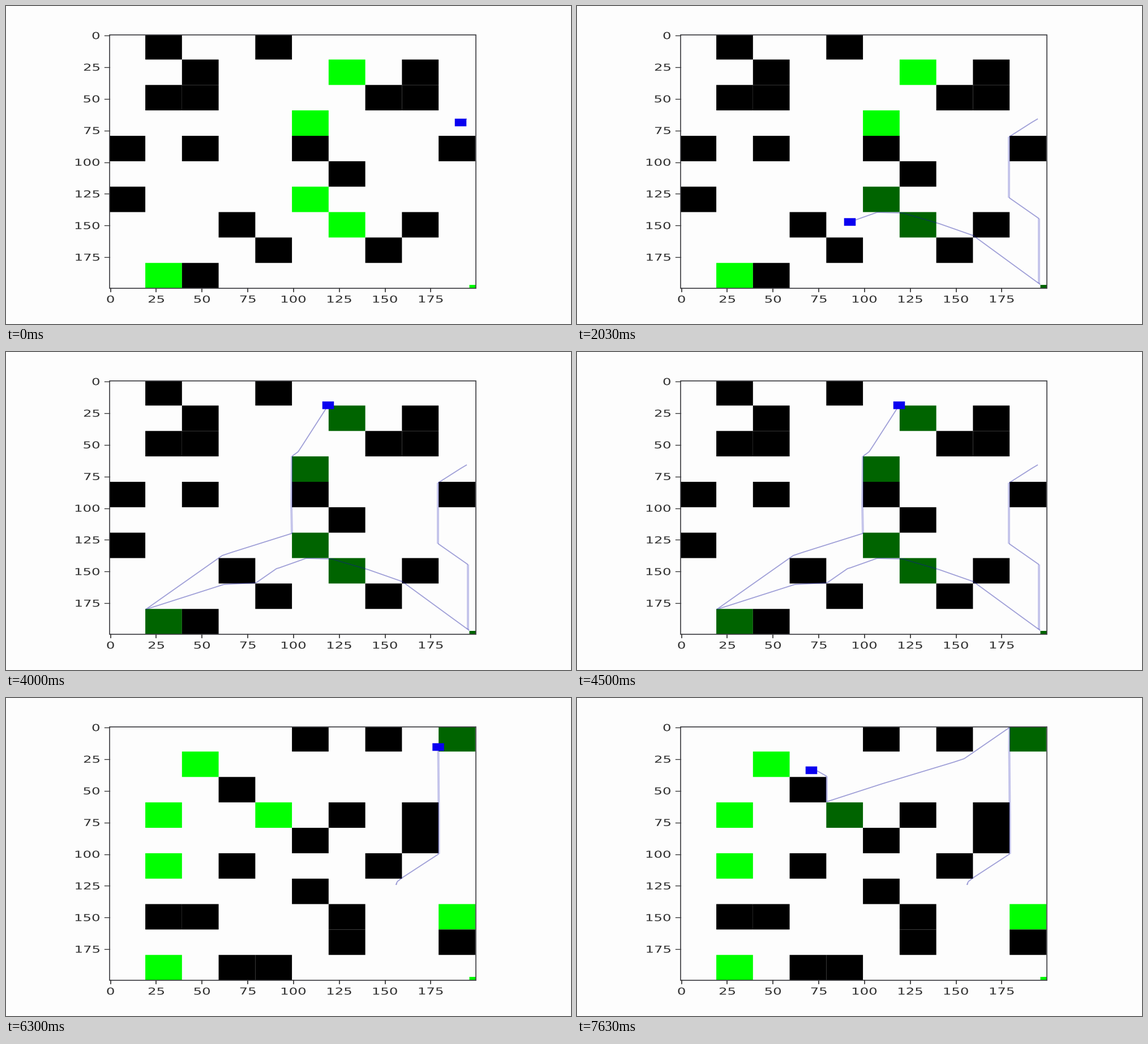
Recreate the animation shown at these times as a matplotlib script. Size 998 px wide and 561 px high, loop 8 s.

```python
import matplotlib.pyplot as plt
from matplotlib.animation import FuncAnimation
from matplotlib.patches import PathPatch, Rectangle
from matplotlib.textpath import TextPath
from matplotlib.transforms import Affine2D

W, H, DPI = 998, 561, 100
LOOP, STEP = 8000, 50
PX = 72 / DPI  # points per pixel

LEFT, TOP, RIGHT, BOTTOM = 183, 51, 829.7, 498
CELL_X, CELL_Y, CELL_W, CELL_H = 181.3, 49.6, 64.76, 44.85
SX, SY = 1.753, 1.21  # the whole 640 x 480 plot is enlarged by these factors
TICK, PAD, FONT = 4.86, 4.86, 13.9

BACK, INK = "#fdfdfd", "#303030"
WALL, TODO, DONE, AGENT = "#000000", "#00ff00", "#006400", "#0a00f0"

# '#' is a wall, 'o' a target
MAZES = [
    """.#..#.....
       ..#...o.#.
       .##....##.
       .....o....
       #.#..#...#
       ......#...
       #....o....
       ...#..o.#.
       ....#..#..
       .o#.......""",
    """.....#.#.o
       ..o.......
       ...#......
       .o..o.#.#.
       .....#..#.
       .o.#...#..
       .....#....
       .##...#..o
       ......#..#
       .o.##.....""",
]
CORNER = "corner"

# Each leg: start time, way points, targets reached
TOURS = [
    [(0, [(814, 199), (803, 205.5)], []),
     (400, [(763, 231), (763, 310)], []),
     (800, [(763, 338), (816, 375), (816, 424)], []),
     (1200, [(816, 489), (818, 491), (787, 468.5)], [CORNER]),
     (1600, [(700, 405), (640, 384)], []),
     (1970, [(575, 365), (530, 364), (482, 381)], [(6, 7), (5, 6)]),
     (2370, [(478, 382), (442, 407), (385, 410), (247, 454)], [(1, 9)]),
     (2800, [(382, 359), (400, 353)], []),
     (3200, [(505, 320), (504, 267)], []),
     (3600, [(505, 184), (516, 176), (522, 167)], [(5, 3)]),
     (4000, [(569, 94)], [(6, 1)])],
    [(5130, [(690, 327), (689, 329.5)], []),
     (5500, [(691, 324), (700, 317), (764.5, 275), (764.5, 205)], []),
     (6300, [(763.5, 86.5)], [(9, 0)]),
     (6800, [(764, 52), (684, 107), (666, 113)], []),
     (7200, [(540, 151)], []),
     (7600, [(441, 183), (441, 138), (425, 129), (414, 127.5)], [(4, 3)])],
]

fig = plt.figure(figsize=(W / DPI, H / DPI), dpi=DPI, facecolor=BACK)
ax = fig.add_axes([0, 0, 1, 1])
ax.set_xlim(0, W)
ax.set_ylim(H, 0)
ax.axis("off")

frame = Rectangle((LEFT, TOP), RIGHT - LEFT, BOTTOM - TOP, fill=False,
                  ec="#404044", lw=1.7 * PX, zorder=6)
ax.add_patch(frame)


def box(x, y, w, h, color, z):
    patch = Rectangle((x, y), w, h, fc=color, lw=0, zorder=z, snap=False)
    ax.add_patch(patch)
    patch.set_clip_path(frame)
    return patch


def label(text, x, y, align):
    """Draw a tick label, centred below (x, y) or ending at x."""
    path = TextPath((0, 0), text, size=FONT, prop={"family": "DejaVu Sans"})
    ext = path.get_extents()
    ox = (ext.x0 + ext.x1) / 2 if align == "center" else ext.x1
    oy = ext.y1 if align == "center" else (ext.y0 + ext.y1) / 2
    move = Affine2D().translate(-ox, -oy).scale(SX, -SY).translate(x, y)
    ax.add_patch(PathPatch(path, fc=INK, lw=0, transform=move + ax.transData))


def draw_ticks():
    for v in range(0, 200, 25):
        x = LEFT + (v + 0.5) * (RIGHT - LEFT) / 200
        y = TOP + (v + 0.5) * (BOTTOM - TOP) / 200
        ax.plot([x, x], [BOTTOM, BOTTOM + TICK * SY], color=INK, lw=1.7 * PX)
        ax.plot([LEFT - TICK * SX, LEFT], [y, y], color=INK, lw=1.3 * PX)
        label(str(v), x, BOTTOM + (TICK + PAD) * SY + 1, "center")
        label(str(v), LEFT - (TICK + PAD) * SX - 1, y, "right")


def build_maze(text):
    """Return the wall patches and a dict of target patches."""
    walls, targets = [], {}
    for row, line in enumerate(text.split()):
        for col, char in enumerate(line):
            if char == ".":
                continue
            spot = (CELL_X + col * CELL_W, CELL_Y + row * CELL_H)
            if char == "#":
                walls.append(box(*spot, CELL_W, CELL_H, WALL, 2))
            else:
                targets[col, row] = box(*spot, CELL_W, CELL_H, TODO, 2)
    targets[CORNER] = box(818.5, 492, 12, 6, TODO, 2)
    return walls, targets


def split_trail(points):
    """Separate upright pieces, which look wider and paler, from the rest."""
    upright, slanted = [], []
    gap = (float("nan"), float("nan"))
    for a, b in zip(points, points[1:]):
        steep = abs(a[0] - b[0]) < 2 and abs(a[1] - b[1]) > 8
        (upright if steep else slanted).extend([a, b, gap])
    return upright or [gap], slanted or [gap]


draw_ticks()
mazes = [build_maze(text) for text in MAZES]
wide, = ax.plot([], [], color="#1414b4", alpha=0.24, lw=4 * PX, zorder=3,
                solid_capstyle="butt")
thin, = ax.plot([], [], color="#1414a0", alpha=0.40, lw=1.8 * PX, zorder=3,
                solid_capstyle="butt")
agent = box(0, 0, 20.5, 13.5, AGENT, 5)


def update(i):
    t = i * STEP
    current = int(t >= TOURS[1][0][0])
    legs = [leg for leg in TOURS[current] if leg[0] <= t]
    trail = [p for leg in legs for p in leg[1]]
    reached = {c for leg in legs for c in leg[2]}

    for k, (walls, targets) in enumerate(mazes):
        for patch in walls + list(targets.values()):
            patch.set_visible(k == current)
        for cell, patch in targets.items():
            patch.set_facecolor(DONE if cell in reached else TODO)

    for line, points in zip((wide, thin), split_trail(trail)):
        line.set_data(*zip(*points))
    x, y = trail[-1]
    agent.set_xy((x - 10.25, y - 6.75))
    return []


anim = FuncAnimation(fig, update, frames=LOOP // STEP, interval=STEP,
                     init_func=lambda: update(0), repeat=True, repeat_delay=0)
plt.show()
```
